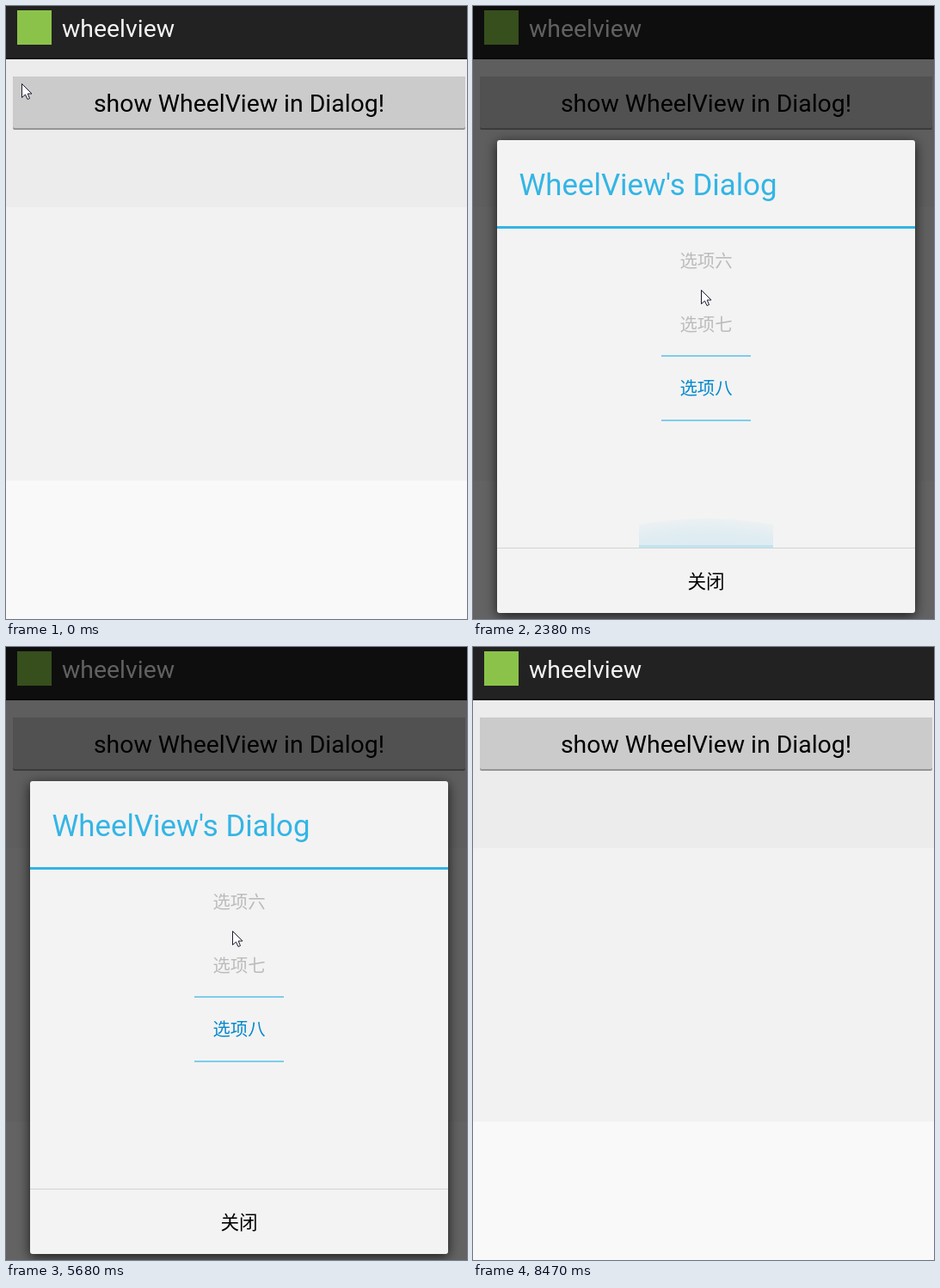
An HTML page with a canvas that plays this animation: 536x713 px, repeating every 8.9 s.

```html
<!DOCTYPE html>
<html lang="zh-CN">
<head>
<meta charset="utf-8">
<title>wheelview</title>
<style>
html, body { margin: 0; width: 100%; height: 100%; overflow: hidden; background: #f2f2f2; }
canvas { display: block; }
</style>
</head>
<body>
<canvas id="stage" width="536" height="713"></canvas>
<script>
const ctx = document.getElementById('stage').getContext('2d');
const LOOP = 8900, OPEN = 430, STEP = 131.8;  // ms; the screen refreshes once per step
const CLOSE = 58, GONE = 61;                  // steps after opening
const W = 536, H = 713, CX = 271;
const LATIN = 'Roboto, sans-serif';
const CJK = '"Noto Sans CJK SC", "Noto Sans CJK JP", "Noto Sans CJK", sans-serif';
const ITEMS = [...'一二三四五六七八'].map(n => '选项' + n);
const TOP = 259, BOTTOM = 630, MID = (TOP + BOTTOM) / 2, ROW = (BOTTOM - TOP) / 5;
const LAST = ITEMS.length - 1;

// Turning points of the hand: step, pointer x, pointer y, wheel position.
// A wheel position outside 0..LAST is overscroll and shows as an edge glow.
const path = [
  [0, 18, 90, 3], [7, 272, 533, 3], [9, 272, 533, 3], [14, 266, 330, 7.6],
  [17, 262, 330, 7], [24, 259, 572, -.4], [25, 259, 572, 0], [32, 268, 394, 3.49],
  [36, 264, 330, 7], [42, 262, 330, 7], [47, 260, 530, -1], [49, 272, 688, 0],
  [51, 275, 600, 0], [54, 278, 380, 5], [57, 279, 684, 6]
];

const clamp = (v, lo, hi) => Math.min(hi, Math.max(lo, v));
const smooth = f => f * f * (3 - 2 * f);

function pose(step) {
  const k = clamp(step, 0, path.at(-1)[0]);
  const i = Math.max(1, path.findIndex(p => p[0] >= k));
  const a = path[i - 1], b = path[i];
  const f = smooth((k - a[0]) / (b[0] - a[0]));
  const [, x, y, pos] = a.map((v, j) => v + (b[j] - v) * f);
  return { x, y, pos };
}

function box(x, y, w, h, fill) {
  ctx.fillStyle = fill;
  ctx.fillRect(x, y, w, h);
}

function round(x, y, w, h, r, fill) {
  ctx.fillStyle = fill;
  ctx.beginPath();
  ctx.roundRect(x, y, w, h, r);
  ctx.fill();
}

function text(s, x, y, size, fill, family = LATIN, align = 'left') {
  ctx.font = `${size}px ${family}`;
  ctx.textAlign = align;
  ctx.fillStyle = fill;
  ctx.fillText(s, x, y);
}

function shadow(color, blur, dy = 0) {
  ctx.shadowColor = color;
  ctx.shadowBlur = blur;
  ctx.shadowOffsetY = dy;
}

function drawScreen(pressed) {
  box(0, 0, W, H, '#ececec');
  box(0, 234, W, H, '#f2f2f2');
  box(0, 552, W, H, '#f9f9f9');
  box(0, 0, W, 62, '#222');
  box(0, 60, W, 2, '#181818');
  box(13, 5, 40, 40, '#8bc34a');
  text('wheelview', 65, 36, 28.4, '#f3f3f3');

  ctx.save();
  if (pressed) shadow('#33b5e5', 10);
  round(8, 82, 526, 62, 2, pressed ? '#5fb4d3' : '#959595');
  ctx.restore();
  round(8, 82, 526, 60, 2, pressed ? '#83c8e2' : '#cbcbcb');
  text('show WheelView in Dialog!', CX, 123, 28.4, '#000', LATIN, 'center');
}

// A wide arc of light hanging from an edge; dir is 1 down, -1 up
function drawGlow(g, edge, dir) {
  if (g <= 0) return;
  const h = 19 + 34 * g, r = 434;
  const blue = a => `rgba(51,181,229,${a})`;
  ctx.save();
  ctx.translate(CX, edge);
  ctx.scale(1, dir);
  const fill = ctx.createRadialGradient(0, h - r, r - h, 0, h - r, r);
  fill.addColorStop(0, blue(.03 + .18 * g));
  fill.addColorStop(.5, blue(.03 + .16 * g));
  fill.addColorStop(.97, blue(.04));
  fill.addColorStop(1, blue(0));
  box(-78, 0, 156, h, fill);
  box(-78, 0, 156, 3, blue(.3 * Math.max(0, 1 - g)));
  ctx.restore();
}

function drawWheel(target) {
  const pos = clamp(target, 0, LAST);
  ctx.save();
  ctx.beginPath();
  ctx.rect(28, TOP, 486, BOTTOM - TOP);
  ctx.clip();
  ITEMS.forEach((s, i) => {
    const y = Math.round(MID) + Math.round((i - pos) * ROW);
    text(s, CX, y + 7, 20.4, i === Math.round(pos) ? '#0288ce' : '#bbb', CJK, 'center');
  });
  for (const side of [-1, 1]) box(219, Math.round(MID + side * ROW / 2 - 1), 104, 2, '#7dcdec');
  drawGlow(pos - target, TOP, 1);
  drawGlow(target - pos, BOTTOM, -1);
  ctx.restore();
}

function drawDialog(pos, fade, closing) {
  box(0, 0, W, H, `rgba(0,0,0,${.6 * fade})`);
  ctx.save();
  ctx.globalAlpha = fade;
  const zoom = .92 + .08 * fade;
  ctx.translate(CX, 431);
  ctx.scale(zoom, zoom);
  ctx.translate(-CX, -431);

  ctx.save();
  shadow('rgba(0,0,0,.75)', 14, 3);
  round(28, 156, 486, 550, 3, '#f3f3f3');
  ctx.restore();
  text("WheelView's Dialog", 53.5, 219.5, 34.8, '#33b5e5');
  box(28, 256, 486, 3, '#33b5e5');
  drawWheel(pos);
  box(28, BOTTOM, 486, 1, '#d3d3d3');
  if (closing) round(28, 631, 486, 75, [0, 0, 3, 3], '#82cdea');
  text('关闭', CX, 677, 21.6, '#000', CJK, 'center');
  ctx.restore();
}

function drawPointer(x, y) {
  ctx.save();
  ctx.translate(Math.round(x) + .5, Math.round(y) + .5);
  const arrow = new Path2D('M0 0V16L4 12.5L6.5 18L9 17L6.7 11.5H11.5Z');
  ctx.fillStyle = '#fff';
  ctx.fill(arrow);
  ctx.strokeStyle = '#1c1c30';
  ctx.stroke(arrow);
  ctx.restore();
}

function draw(time) {
  const step = Math.floor((time % LOOP - OPEN) / STEP + .2);
  const { x, y, pos } = pose(step);
  const fade = clamp(Math.min((step + 1) / 2, (GONE - step) / 3), 0, 1);
  drawScreen(step === -2 || step === -1);
  if (fade > 0) drawDialog(pos, fade, step >= CLOSE);
  if (step < GONE) drawPointer(x, y);
}

const start = performance.now();
function tick() {
  draw(performance.now() - start);
  requestAnimationFrame(tick);
}
tick();
</script>
</body>
</html>
```
